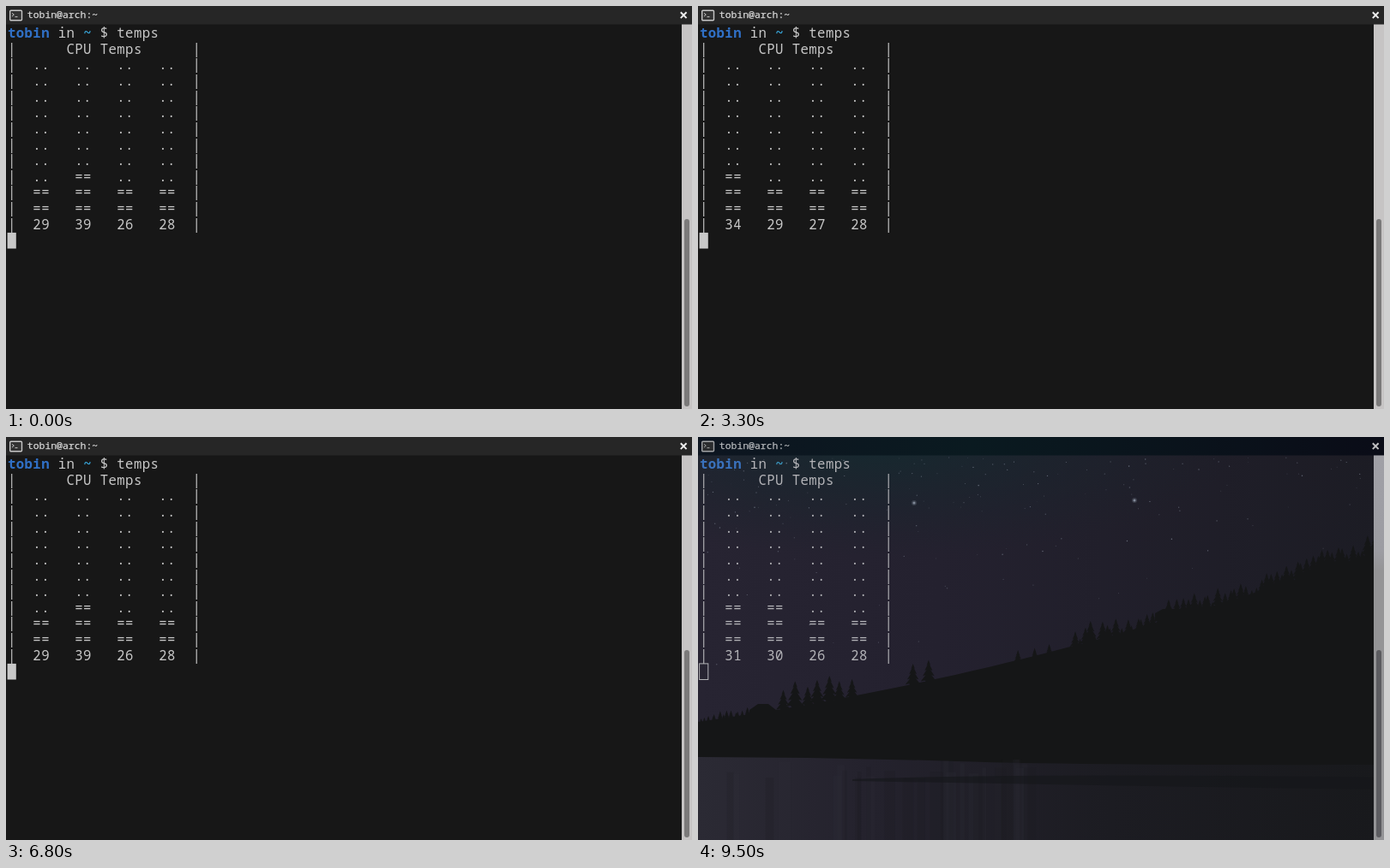
Animation of 800x471 px, one loop 9900 ms. Source, as an HTML page:

```html
<!DOCTYPE html>
<html lang="en">
<head>
<meta charset="utf-8">
<title>CPU temps</title>
<style>
  html, body { margin: 0; width: 100%; height: 100%; overflow: hidden; background: #171717; }
  svg { display: block; width: 800px; height: 471px; }
  text { white-space: pre; font-family: "Noto Sans Mono", "DejaVu Sans Mono", monospace; }
  #screen { font-size: 16px; letter-spacing: .4px; fill: #c8c8c8; }
  #title { font-size: 11.45px; fill: #d6d6d6; stroke: #d6d6d6; stroke-width: .25; }
  .user { fill: #3070c6; font-weight: bold; }
  .path { fill: #38a6da; font-weight: bold; }
  .bar { fill: #262626; }
  .track { fill: #c6c4c4; }
  .thumb { fill: #7b7a7a; }
  .cursor { fill: #c8c8c8; }
  #scene { visibility: hidden; }
  .idle #scene { visibility: visible; }
  .idle #screen { fill: #b3b3b7; }
  .idle #title { fill: #b4b7ba; stroke: #b4b7ba; }
  .idle .user { fill: #3a72bd; }
  .idle .path { fill: #3c9cc6; }
  .idle .bar { fill: url(#barTone); }
  .idle .track { fill: url(#trackTone); }
  .idle .thumb { fill: #5c5c60; }
  .idle .cursor { fill: none; stroke: #b3b3b7; }
  .idle #icons { opacity: .8; }
</style>
</head>
<body>
<svg id="stage" viewBox="0 0 800 471">
  <defs>
    <linearGradient id="sky">
      <stop offset="0" stop-color="#272432"/>
      <stop offset=".35" stop-color="#24212f"/>
      <stop offset="1" stop-color="#1c1c24"/>
    </linearGradient>
    <radialGradient id="aurora" gradientUnits="userSpaceOnUse" cx="0" cy="0" r="1"
      gradientTransform="translate(210 10) scale(420 130)">
      <stop offset="0" stop-color="#16292f"/>
      <stop offset="1" stop-color="#1a222b" stop-opacity="0"/>
    </radialGradient>
    <linearGradient id="water">
      <stop offset="0" stop-color="#2b2a34"/>
      <stop offset=".25" stop-color="#24222d"/>
      <stop offset=".6" stop-color="#1c1c22"/>
      <stop offset="1" stop-color="#18191c"/>
    </linearGradient>
    <linearGradient id="barTone">
      <stop offset="0" stop-color="#0d1520"/>
      <stop offset=".4" stop-color="#0a1a20"/>
      <stop offset="1" stop-color="#0a0c17"/>
    </linearGradient>
    <linearGradient id="trackTone" x1="0" y1="0" x2="0" y2="1">
      <stop offset="0" stop-color="#a0a0a6"/>
      <stop offset=".25" stop-color="#9c9ca2"/>
      <stop offset=".3" stop-color="#949496"/>
    </linearGradient>
  </defs>
  <rect width="800" height="471" fill="#171717"/>
  <g id="scene">
    <rect width="800" height="400" fill="url(#sky)"/>
    <rect width="800" height="400" fill="url(#aurora)"/>
    <g id="stars" fill="#8a92a2"></g>
    <path id="hill" fill="#151617"/>
    <path d="M0 374Q150 374 300 379T800 383V471H0Z" fill="url(#water)"/>
    <g id="streaks"></g>
    <path d="M180 400Q400 392 800 398V412Q500 408 180 402Z" fill="#151619" opacity=".6"/>
  </g>
  <rect class="bar" width="800" height="21.5"/>
  <g id="icons" fill="none" stroke="#c8c8c8">
    <rect x="4.7" y="5.2" width="13.8" height="11.6" rx="1" fill="#333" stroke-width="1.4"/>
    <path d="M7 8.3L9.3 10.2L7 12.1M10.5 12.7H13.5"/>
    <path d="M786.8 7.3L793.6 14.1M793.6 7.3L786.8 14.1" stroke="#ececec" stroke-width="2"/>
  </g>
  <text id="title" x="24.8" y="14.4">tobin@arch:~</text>
  <rect class="track" x="788" y="21.5" width="12" height="449.5"/>
  <rect class="thumb" x="791" y="249" width="6" height="219" rx="3"/>
  <g id="screen" transform="scale(.98)"></g>
  <rect class="cursor" x="1.6" y="264.9" width="10.2" height="18.6"/>
</svg>
<script>
const LOOP = 9900, IDLE_FROM = 9500;
// start time, then the core temperatures that leave their resting values
const readings = [
  [0, 29, 39, 26], [500, 35, 29, 26], [1300, 36, 29], [2800, 31, 30, 27, 34],
  [3300, 34, 29], [4500, 35], [5300], [6800, 29, 39, 26], [7300, 29, 40, 26],
  [8400], [9400, 31, 30, 26]
];
const coreTemps = ([, a = 31, b = 30, c = 27, d = 28]) => [a, b, c, d];

const byId = id => document.getElementById(id);
const make = (tag, attrs, parent) => {
  const el = document.createElementNS("http://www.w3.org/2000/svg", tag);
  for (const key in attrs) el.setAttribute(key, attrs[key]);
  return parent.appendChild(el);
};

const lines = Array.from({ length: 13 }, (_, row) =>
  make("text", { x: 2, y: 38 + row * 19 }, byId("screen")));
lines[0].innerHTML = '<tspan class="user">tobin</tspan> in <tspan class="path">~</tspan> $ temps';
lines[1].textContent = "|      CPU Temps      |";

const framed = cells => "|  " + cells.join("   ") + "  |";

function showTemps(temps) {
  for (let level = 10; level > 0; level--) {
    lines[12 - level].textContent = framed(temps.map(t => t >= level * 10 ? "==" : ".."));
  }
  lines[12].textContent = framed(temps);
}

function random(seed) {
  return () => (seed = (seed * 16807) % 2147483647) / 2147483647;
}
const rnd = random(4127);
const between = (low, high) => low + (high - low) * rnd();

const ridgeY = x => 333 - .1417 * x - .00014 * x * x;

// a fir with four tiers of branches
function fir(x, h) {
  const base = ridgeY(x) + 4;
  let left = "", right = "";
  for (let i = 1; i <= 4; i++) {
    const w = h * .08 * i, y = base - h + h * .22 * i;
    right += `L${x + w} ${y}L${x + w * .5} ${y - 1}`;
    left = `L${x - w * .5} ${y - 1}L${x - w} ${y}` + left;
  }
  return `M${x} ${base - h}${right}L${x + 1} ${base}L${x - 1} ${base}${left}Z`;
}

function grove(from, to, step, low, high) {
  let d = "";
  for (let x = from; x <= to; x += step) d += fir(x + between(-2, 2), between(low, high));
  return d;
}

function drawStars() {
  const star = (x, y, r, opacity) => make("circle", { cx: x, cy: y, r, opacity }, byId("stars"));
  for (let i = 0; i < 170; i++) {
    const x = between(0, 788), y = 24 + rnd() * between(0, 250);
    if (y < ridgeY(x) - 20) star(x, y, between(.4, .8), between(.2, .7));
  }
  for (const [x, y] of [[252, 77], [509, 74]]) {
    star(x, y, 3, .25);
    star(x, y, 1.5, .9);
  }
}

function drawHill() {
  let d = "M0 390";
  for (let x = 0; x <= 800; x += 20) d += `L${x} ${ridgeY(x)}`;
  d += "V390Z" + grove(0, 60, 4, 6, 13) + grove(100, 180, 13, 24, 36) + grove(249, 268, 18, 27, 34)
    + grove(374, 412, 18, 13, 18) + grove(440, 800, 6, 8, 28);
  d += "M60 328V319L70 312H82L91 319V328ZM533 215V206L542 201H572L580 206V215Z";
  byId("hill").setAttribute("d", d);
}

function drawStreaks() {
  for (let i = 0; i < 30; i++) {
    make("rect", {
      x: between(0, 400), y: between(376, 400), width: between(4, 16), height: 95,
      fill: rnd() < .5 ? "#302d3b" : "#191a1f", opacity: .2
    }, byId("streaks"));
  }
}

let shown;
function draw(time) {
  const t = time % LOOP;
  const reading = readings.findLast(r => r[0] <= t);
  if (reading !== shown) showTemps(coreTemps(shown = reading));
  byId("stage").classList.toggle("idle", t >= IDLE_FROM);
}

drawStars();
drawHill();
drawStreaks();
const start = performance.now();
function tick(now) {
  draw(Math.max(0, now - start));
  requestAnimationFrame(tick);
}
tick(start);
</script>
</body>
</html>
```
